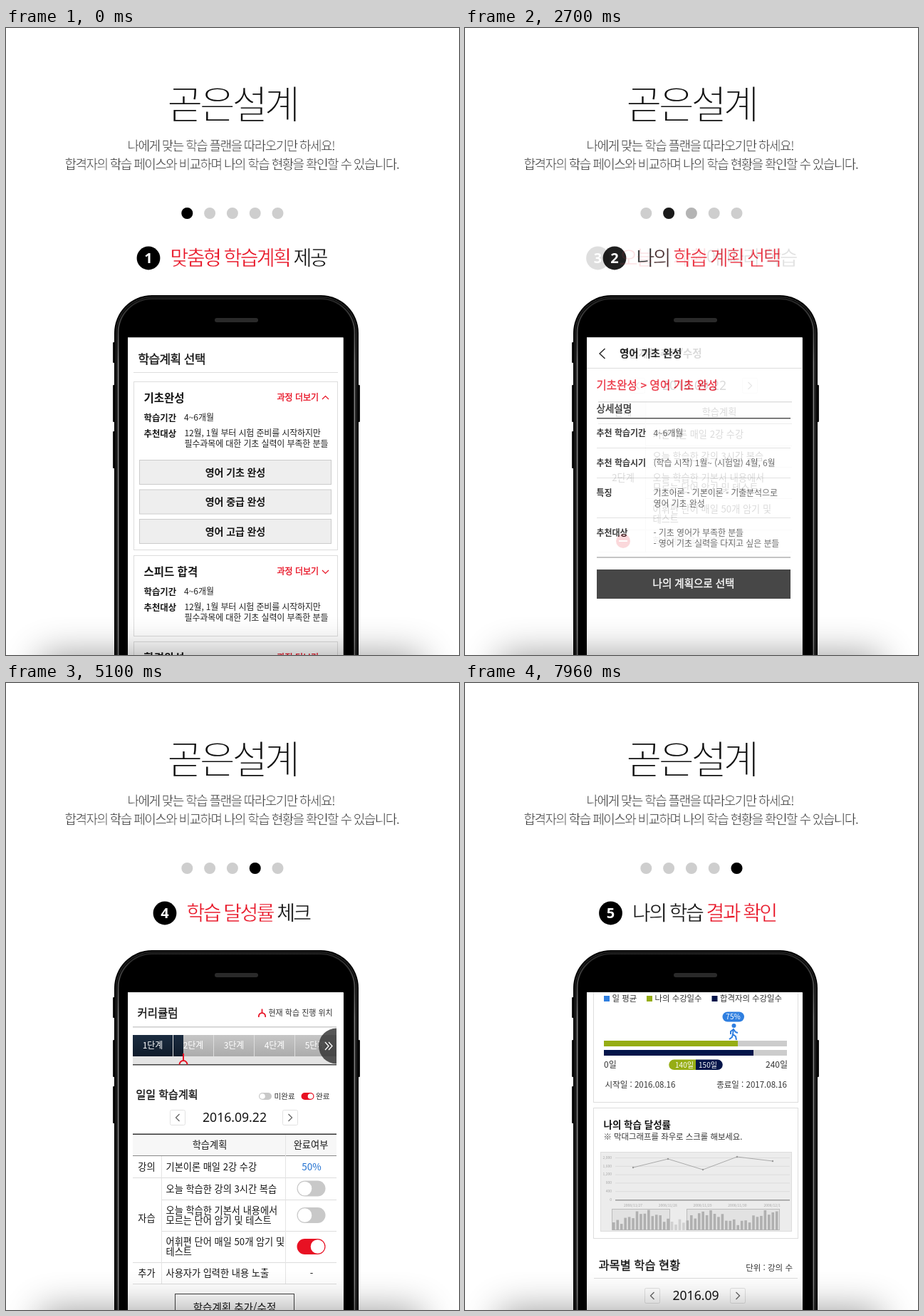
An HTML page that plays this animation: 636 px wide and 880 px high, repeating every 8000 ms.

```html
<!DOCTYPE html>
<html lang="ko">
<head>
<meta charset="utf-8">
<title>곧은설계</title>
<style>
html, body { margin: 0; height: 100%; overflow: hidden; background: #fff; }
svg { display: block; width: 100%; height: 100%; font-family: 'Noto Sans CJK KR', 'Noto Sans KR', 'Noto Sans CJK', sans-serif; }
text { white-space: pre; }
.latin { font-family: 'Noto Sans', sans-serif; }
</style>
</head>
<body>
<svg id="stage" viewBox="0 0 636 880"></svg>
<script>
const RED = '#e81123', INK = '#151515', GRAY = '#555', BLUE = '#1f6fd0', GREEN = '#96ad14', NAVY = '#04154a';
const MID = 'text-anchor="middle"', END = 'text-anchor="end"', BOLD = 'font-weight="700"';
// In-between weights: a stroke in the text colour thickens the glyphs, a white one thins them.
const MEDIUM = 'stroke="currentColor" stroke-width=".35"';
const thin = w => `stroke="#fff" stroke-width="${w}"`;

// Text is placed by the vertical centre of its glyphs.
const text = (x, cy, size, str, fill = INK, attrs = '') =>
  `<text x="${x}" y="${cy + size * 0.365}" font-size="${size}" fill="${fill}" color="${fill}" ${attrs}>${str}</text>`;
const rect = (x, y, w, h, fill, attrs = '') =>
  `<rect x="${x}" y="${y}" width="${w}" height="${h}" fill="${fill}" ${attrs}/>`;
const box = (x, y, w, h, fill = '#fff', stroke = '#ddd') =>
  rect(x + 0.5, y + 0.5, w - 1, h - 1, fill, `stroke="${stroke}"`);
const hline = (x1, x2, y, color = '#ddd', h = 1) => rect(x1, y, x2 - x1, h, color);
const vline = (x, y1, y2, color = '#e4e4e4') => rect(x, y1, 1, y2 - y1, color);
const path = (d, stroke, width = 1, attrs = '') =>
  `<path d="${d}" fill="none" stroke="${stroke}" stroke-width="${width}" ${attrs}/>`;
const circle = (x, y, r, fill, attrs = '') => `<circle cx="${x}" cy="${y}" r="${r}" fill="${fill}" ${attrs}/>`;

const toggle = (cx, cy, w, h, on) =>
  rect(cx - w / 2, cy - h / 2, w, h, on ? RED : '#c8c8c8', `rx="${h / 2}"`) +
  circle(cx + (on ? 1 : -1) * (w - h) / 2, cy, h / 2 - 1.2, '#fff');

function dateNav(cx, cy, date, reach = 79) {
  const arrow = (x, d) => rect(x - 10.5, cy - 10.5, 21, 21, '#fff', 'stroke="#e2e2e2" rx="2"') +
    path(`M${x - 2.5 * d} ${cy - 5}l${5 * d} 5l${-5 * d} 5`, '#666', 1.3);
  return arrow(cx - reach, -1) + arrow(cx + reach, 1) +
    text(cx + 1, cy, 17.6, date, '#111', MID + ' class="latin"');
}

const header = title => path('M196.5 450l-7.5 7l7.5 7', '#222', 1.4) +
  text(217, 456.5, 14.5, title, INK, BOLD + ' letter-spacing="-.1"') + hline(171, 473, 477);

function courseCard(y, h, title, open) {
  const d = open ? -1 : 1;
  return box(179, y, 287, h) +
    text(193.5, y + 23, 15.5, title, INK, BOLD) +
    text(380.5, y + 23, 12, '과정 더보기', RED, MEDIUM) +
    path(`M444 ${y + 23 - 2 * d}l4.5 ${4.5 * d}l4.5 ${-4.5 * d}`, RED, 1.2) +
    text(193.5, y + 51, 12.4, '학습기간', INK, BOLD) + text(250, y + 51, 12, '4~6개월', '#222') +
    text(193.5, y + 73, 12.4, '추천대상', INK, BOLD) +
    text(250.5, y + 73, 12, '12월, 1월 부터 시험 준비를 시작하지만', '#222', 'letter-spacing="-.15"') +
    text(250.5, y + 88, 12, '필수과목에 대한 기초 실력이 부족한 분들', '#222', 'letter-spacing="-.12"');
}

function chooseScreen() {
  const levels = ['기초', '중급', '고급'].map((level, i) =>
    box(187, 606 + 41.5 * i, 270, 35, '#eee', '#ccc') +
    text(322, 623.5 + 41.5 * i, 14, `영어 ${level} 완성`, INK, `${MID} ${BOLD} letter-spacing="-.1"`));
  return text(185.5, 465, 17, '학습계획 선택', INK, MEDIUM + ' letter-spacing="-.6"') + hline(179, 466, 483) +
    courseCard(496, 237, '기초완성', true) + levels.join('') +
    courseCard(740, 114, '스피드 합격') + courseCard(861, 114, '합격완성');
}

function detailScreen() {
  const rows = [
    [569, '추천 학습기간', '4~6개월'],
    [611, '추천 학습시기', '(학습 시작) 1월~ (시험일) 4월, 6월'],
    [653, '특징', '기초이론 - 기본이론 - 기출분석으로', '영어 기초 완성'],
    [709, '추천대상', '- 기초 영어가 부족한 분들', '- 영어 기초 실력을 다지고 싶은 분들']];
  return header('영어 기초 완성') +
    text(184.5, 501, 15.5, '기초완성 > 영어 기초 완성', RED, MEDIUM + ' letter-spacing=".1"') +
    text(184.5, 534, 13.5, '상세설명', INK, MEDIUM) + hline(185, 457, 547, '#333', 1.5) +
    rows.map(([y, name, ...lines]) => text(184.5, y, 12, name, INK, BOLD) +
      lines.map((s, i) => text(264.5, y + 14.5 * i, 12, s, GRAY, 'letter-spacing="-.1"')).join('')).join('') +
    [589, 631, 687].map(y => hline(185, 457, y)).join('') + hline(185, 457, 742.5, '#777') +
    rect(185, 760, 272, 41, '#252525') + text(321, 780, 14.5, '나의 계획으로 선택', '#fff', `${MID} ${MEDIUM}`);
}

const tasks = (x, y) => [
  [0, '기본이론 매일 2강 수강'], [31, '오늘 학습한 강의 3시간 복습'],
  [61.5, '오늘 학습한 기본서 내용에서'], [75, '모르는 단어 암기 및 테스트'],
  [105.5, '어휘편 단어 매일 50개 암기 및'], [119, '테스트']
].map(([dy, s]) => text(x, y + dy, 13.2, s)).join('');

function editScreen() {
  return header('학습계획 추가/수정') + dateNav(321, 502, '2016.09.22') +
    rect(187, 525, 272, 30, '#f7f7f7') + hline(187, 459, 524, '#333', 1.5) + hline(187, 459, 555, '#888') +
    [586, 616, 660].map(y => hline(253, 459, y)).join('') + hline(187, 459, 704) + hline(187, 459, 735) +
    vline(253, 526, 735) + text(222, 539, 13.2, '단계', INK, MID) + text(357, 539, 13.2, '학습계획', INK, MID) +
    tasks(263.5, 570) + text(222, 631, 13.2, '2단계', INK, MID) +
    circle(222, 720, 10, RED) + hline(216, 228, 719, '#fff', 2) +
    text(263.5, 720, 13.2, '학습계획을 입력하세요.', '#888');
}

function checkScreen() {
  const marker = (x, y, s) => path(`M${x} ${y}v${6 * s}M${x - 5 * s} ${y + 12 * s}q0 ${-6 * s} ${5 * s} ${-6 * s}t${5 * s} ${6 * s}`, RED, 1.7);
  const stages = [0, 1, 2, 3, 4].map(i =>
    text(206 + 57 * i, 509, 12, `${i + 1}단계`, '#fff', MID) + (i ? vline(177 + 57 * i, 494, 524, '#ddd') : ''));
  return text(184.5, 463, 15.5, '커리큘럼', INK, MEDIUM) + marker(359.5, 457.5, 0.95) +
    text(368.5, 463, 11, '현재 학습 진행 위치', '#333') + hline(178, 464, 482, '#ccc', 1.5) +
    rect(178, 494, 286, 30, 'url(#track)') + rect(178, 494, 71, 30, 'url(#done)') + stages.join('') +
    rect(178, 524, 286, 11, '#e4e4e4') + hline(178, 464, 535, '#444', 1.5) +
    path('M249 520v10M243.5 535.5a5.5 5.5 0 0 1 11 0', RED, 2) +
    '<path d="M464 484.5a25 25 0 0 0 0 50z" fill="#333" fill-opacity=".82"/>' +
    path('M448 504l5 5.5l-5 5.5M453 504l5 5.5l-5 5.5', '#fff', 1.3) +
    text(182.5, 578, 15, '일일 학습계획', INK, MEDIUM) +
    toggle(364, 580, 18, 10) + text(376.5, 580, 10.6, '미완료', '#333') +
    toggle(423.5, 580, 18, 10, true) + text(435, 580, 10.6, '완료', '#333') +
    dateNav(320, 610, '2016.09.22') +
    rect(178, 633, 286, 30, '#f7f7f7') + hline(178, 464, 632.5, '#333', 1.5) + hline(178, 464, 663, '#888') +
    [694, 813, 843].map(y => hline(178, 464, y)).join('') + [725, 769].map(y => hline(218, 464, y)).join('') +
    vline(218, 664, 843) + vline(392, 634, 843) +
    text(286, 648, 13.2, '학습계획', INK, MID) + text(428, 648, 13.2, '완료여부', INK, MID) +
    tasks(224.5, 679) + text(224.5, 828, 13.2, '사용자가 입력한 내용 노출') +
    [['강의', 679], ['자습', 751], ['추가', 828]].map(([s, y]) => text(197.5, y, 13.2, s, INK, MID)).join('') +
    text(429, 679, 13.5, '50%', BLUE, MID) + text(429, 828, 13, '-', INK, MID) +
    toggle(428.5, 709.5, 40, 22) + toggle(428.5, 747, 40, 22) + toggle(428.5, 791, 40, 22, true) +
    box(237, 857, 168, 42, '#fff', '#444') + text(321, 877, 14.5, '학습계획 추가/수정', INK, MID);
}

function chart() {
  const faint = '#aaa';
  const points = [[236, 886], [285, 874], [334, 889], [382, 871], [432, 877]];
  let s = box(190, 864, 269, 112, '#ececec', '#ddd');
  ['2,000', '1,600', '1,200', '800', '400', '0'].forEach((label, i) => {
    const y = 872 + 11.8 * i;
    s += text(206, y, 5, label, faint, END) + hline(211, 456, y, i < 5 ? '#ddd' : '#999', i < 5 ? 1 : 1.5);
  });
  s += path('M' + points.join('L'), faint) + points.map(([x, y]) => circle(x, y, 1.2, '#999')).join('');
  ['2008/11/27', '2008/11/28', '2008/11/29', '2008/11/30', '2008/12/1'].forEach((d, i) =>
    s += text(236 + 48.8 * i, 939, 5, d, faint, MID));
  s += box(206, 944, 82, 30, '#e2e2e2', '#bbb') + box(311, 944, 131, 30, '#e2e2e2', '#bbb');
  for (let i = 0; i < 43; i++) {
    const x = 207 + 5.45 * i, gap = x > 286 && x < 310;
    const h = 18 + 7 * Math.sin(i * 0.39 - 1.6) + 4 * Math.sin(i * 2.3);
    s += rect(x, 974 - h, 3.6, h, gap ? '#d0d0d0' : '#b0b0b0');
  }
  return s;
}

function resultScreen() {
  const columns = [['일일', '00%', RED], ['일 평균', '75%', BLUE], ['이번 달 최저', '49%', RED], ['이번 달 최고', '50%', BLUE]];
  const legend = [[195, '일 평균', '#2f7fe0'], [255, '나의 수강일수', GREEN], [346.5, '합격자의 수강일수', NAVY]];
  const bar = (y, end, color) => rect(195, y, 257, 8, '#ccc') + rect(195, y, end - 195, 8, color);
  return text(187.5, 463, 16.4, '나의 학습 달성률', INK, MEDIUM) +
    circle(315.5, 463, 8, 'none', `stroke="${RED}" stroke-width="1.5"`) + text(315.5, 463, 12.5, '?', RED, `${MID} ${BOLD}`) +
    hline(181, 467, 480.5) + dateNav(323, 505, '2016.09.22') +
    rect(181, 529, 286, 30, '#f7f7f7') + hline(181, 467, 528, '#333', 1.5) + hline(181, 467, 558.5, '#888') + hline(181, 467, 593) +
    columns.map(([name, value, color], i) => {
      const x = 216.5 + 71.6 * i;
      return text(x, 543, 13.2, name, INK, MID) + text(x, 576.5, 15.3, value, color, MID) + (i ? vline(x - 36, 530, 593) : '');
    }).join('') +
    box(180, 609, 288, 186) + text(194.5, 630.5, 13.3, '학습 레이스', INK, BOLD) +
    legend.map(([x, name, color]) => rect(x, 645, 8, 8, color) + text(x + 11.5, 648.5, 11.4, name, '#333')).join('') +
    rect(361.5, 667.5, 30.5, 14, '#2f7fe0', 'rx="7"') + text(376.5, 674.5, 10, '75%', '#fff', MID) +
    circle(377.5, 687, 3, '#2f7fe0') +
    path('M377 691l-1 8l4 3l1 5M376 699l-1 4l-4 3M377 692l-4 3v4M377 692l3 4l3 1', '#2f7fe0', 2, 'stroke-linejoin="round"') +
    bar(708, 383, GREEN) + bar(721, 405, NAVY) +
    text(195, 742, 12, '0일', '#333') + text(453, 742, 12, '240일', '#333', END) +
    `<path d="M324 734.5h-30.5a7.3 7.3 0 0 0 0 14.6h30.5z" fill="${GREEN}"/>` +
    `<path d="M324 734.5h30.5a7.3 7.3 0 0 1 0 14.6h-30.5z" fill="${NAVY}"/>` +
    text(308, 742, 10, '140일', '#fff', MID) + text(341, 742, 10, '150일', '#fff', MID) +
    text(196.5, 770, 11.5, '시작일 : 2016.08.16', '#333') + text(452, 770, 11.5, '종료일 : 2017.08.16', '#333', END) +
    box(180, 802, 288, 184) + text(194.5, 826, 13.5, '나의 학습 달성률', INK, BOLD) +
    text(194.5, 843, 11.4, '※ 막대그래프를 좌우로 스크롤 해보세요.', '#333') + chart() +
    text(187.5, 1023, 16.4, '과목별 학습 현황', INK, MEDIUM) + text(460, 1027, 11.5, '단위 : 강의 수', '#333', END) +
    hline(181, 467, 1041) + dateNav(323, 1066, '2016.09', 60);
}

const red = s => `<tspan fill="${RED}">${s}</tspan>`;
const headings = [
  [200, red('맞춤형 학습계획') + ' 제공'], [210, '나의 ' + red('학습 계획 선택')],
  [186.5, red('오늘의 계획') + '에 따라 학습'], [223, red('학습 달성률') + ' 체크'],
  [204.5, '나의 학습 ' + red('결과 확인')]];
const screens = [chooseScreen, detailScreen, editScreen, checkScreen, resultScreen];
const dotX = i => 254.3 + 31.8 * i;

const phone =
  [[150, 441, 29], [150, 501, 52], [150, 566, 52], [493, 501, 52]].map(([x, y, h]) => rect(x, y, 4, h, '#111', 'rx="1"')).join('') +
  rect(152, 375, 343, 600, '#000', 'rx="53"') +
  rect(154.5, 377.5, 338, 600, 'none', 'rx="50.5" stroke="#333"') +
  rect(157.5, 380, 332, 600, 'none', 'rx="48" stroke="url(#rim)" stroke-width="2"') +
  rect(293, 407, 61, 6, '#2a2a2a', 'rx="3"') + rect(171, 434.5, 302.5, 446, '#fff');

const gradient = (id, a, b, end = 1) =>
  `<linearGradient id="${id}" x2="0" y2="1"><stop stop-color="${a}"/><stop offset="${end}" stop-color="${b}"/></linearGradient>`;
const stage = document.getElementById('stage');
stage.innerHTML =
  `<defs><clipPath id="glass">${rect(171, 434.5, 302.5, 446, '#000')}</clipPath>` +
  gradient('track', '#c6c6c6', '#acacac') + gradient('done', '#1b2c40', '#101c2b') + gradient('rim', '#222', '#777', 0.15) + '</defs>' +
  text(226, 107, 55, '곧은설계', '#111', thin(2.1) + ' letter-spacing="-5.1"') +
  text(170.5, 165, 18, '나에게 맞는 학습 플랜을 따라오기만 하세요!', '#333', thin(0.5) + ' letter-spacing="-1.6"') +
  text(82.5, 191, 18, '합격자의 학습 페이스와 비교하며 나의 학습 현황을 확인할 수 있습니다.', '#333', thin(0.5) + ' letter-spacing="-1.59"') +
  headings.map((_, i) => circle(dotX(i), 260, 8, '#cecece') + circle(dotX(i), 260, 8, '#000', 'class="dot"')).join('') +
  headings.map(([x, s], i) => `<g class="heading">${circle(x, 323, 16.4, '#000')}` +
    text(x, 323, 20, i + 1, '#fff', `${MID} ${BOLD} class="latin"`) +
    text(x + 30.5, 323, 28, s, '#111', thin(0.45) + ' letter-spacing="-2.55"') + '</g>').join('') +
  phone + '<g clip-path="url(#glass)">' +
  screens.map(draw => `<g class="screen">${rect(171, 434, 303, 446, '#fff')}<g>${draw()}</g></g>`).join('') + '</g>' +
  rect(48, 880, 536, 140, '#000', 'opacity=".4" style="filter:blur(26px)"');

const [dots, heads, panels] = ['.dot', '.heading', '.screen'].map(s => [...stage.querySelectorAll(s)]);
const scroller = panels[4].lastElementChild;
const clamp = v => Math.max(0, Math.min(1, v));

function render(now) {
  const t = now % 8000;
  let position = 0;
  for (let i = 0; i < 4; i++) position += clamp((Math.floor((t - 1000 - 1700 * i) / 100) + 1) / 8);
  for (let i = 0; i < 5; i++) {
    const shown = clamp(1 - Math.abs(position - i)), entered = clamp(position - i + 1);
    dots[i].setAttribute('opacity', shown);
    heads[i].setAttribute('opacity', shown);
    panels[i].setAttribute('opacity', entered * (1.3 - 0.3 * entered));
  }
  const scroll = 206 * clamp((Math.floor((t - 7800) / 80) + 1) / 3);
  scroller.setAttribute('transform', `translate(0 ${-scroll})`);
}

const start = performance.now();
(function frame() {
  render(performance.now() - start);
  requestAnimationFrame(frame);
})();
</script>
</body>
</html>
```
